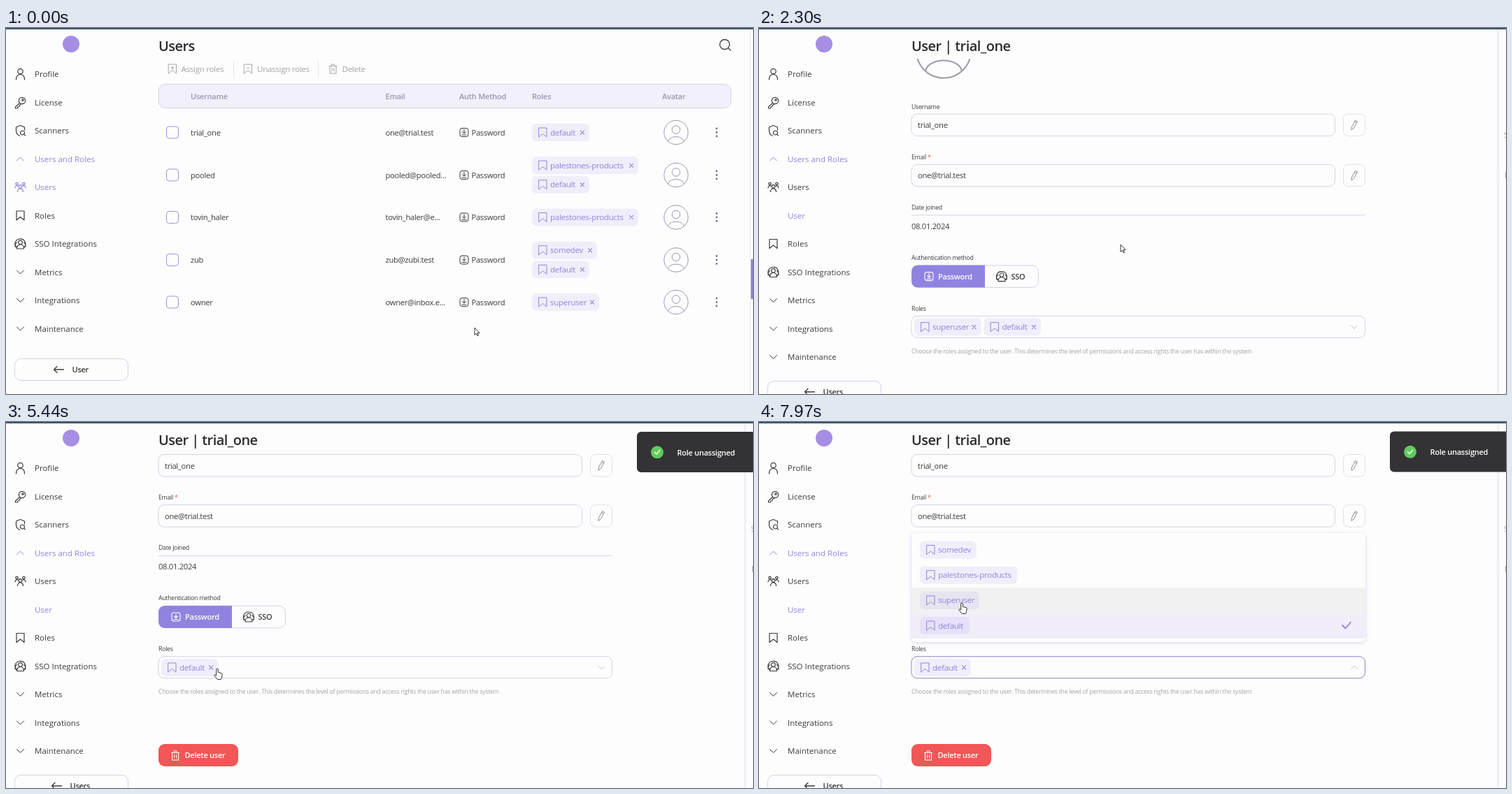
Write an HTML page that moves like this. It is 1068 px wide and 524 px high and loops after 8 s.

```html
<!DOCTYPE html>
<html lang="en">
<head>
<meta charset="utf-8">
<title>Users</title>
<style>
  html, body { margin: 0; width: 100%; height: 100%; overflow: hidden; background: #fdfdfd; }
  svg { display: block; width: 1068px; height: 524px; }
  text { font-family: "Open Sans", "Noto Sans", sans-serif; fill: #3b3b40; white-space: pre; }
  .title { font-size: 20px; font-weight: 600; letter-spacing: -.55px; fill: #2c2c31; }
  .nav { font-size: 11.5px; }
  .body { font-size: 11.2px; letter-spacing: -.3px; }
  .chip { font-size: 11.6px; letter-spacing: -.3px; }
  .bold { font-size: 11px; font-weight: 600; letter-spacing: -.25px; }
  .label { font-size: 8.7px; font-weight: 500; letter-spacing: -.24px; }
  .purple { fill: #9084e0; }
  .gray { fill: #a4a4a8; }
  .head { fill: #9b97b4; }
  .white { fill: #fff; }
  .icon { fill: none; stroke-linecap: round; stroke-linejoin: round; }
</style>
</head>
<body>
<svg id="stage" viewBox="0 0 1068 524" xmlns="http://www.w3.org/2000/svg"></svg>
<script>
const DARK = '#3b3b40', PURPLE = '#9084e0', GRAY = '#a4a4a8', EDGE = '#d6d1ea';
const LOOP = 8000;
const ACCOUNT = 'trial_one', EMAIL = 'one@trial.test', TEAM = 'palestones-products';

// Icons are drawn around their own centre.
const circle = (x, y, r) => `M${x - r} ${y}a${r} ${r} 0 1 0 ${2 * r} 0a${r} ${r} 0 1 0 ${-2 * r} 0`;
const MARK = 'M-5.5-6.5h11v13l-5.5-4.5-5.5 4.5z';
const ICONS = {
  user: circle(0, -4, 3.7) + 'M-6 8c0-5 2-7.5 6-7.5s6 2.500 6 7.500',
  key: circle(2.5, -2.5, 4.7) + circle(3.5, -3.5, 1.2) + 'M-1 1l-6 5.500v2h3l.5-2 2-.5.5-2 2-1.500',
  scan: 'M6-1v-4l-6-2.500-6 2.500v5c0 4 2 6 5 7.500' + circle(3, 3, 3) + 'M5.200 5.200l2 2',
  up: 'M-5 2.500l5-5 5 5',
  down: 'M-5-2.500l5 5 5-5',
  group: circle(0, -1, 2.3) + circle(-5, -5, 1.7) + circle(5, -5, 1.7) +
    'M-4 6.500c0-6 8-6 8 0M-7.500 1c0-3 2-3.500 4-3M7.500 1c0-3-2-3.500-4-3',
  mark: MARK,
  sso: 'M-6 5c-3-4-2-11 5-12 8-.5 10 7 7 12' + circle(0, -2, 2.8) +
    'M-5 7c0-4 2-6 5-6s5 2 5 6zM-5-2c-2 1-2.500 3-2.500 6h2M5-2c2 1 2.500 3 2.500 6h-2',
  login: 'M-3-6h6q3 0 3 3v6q0 3-3 3h-6q-3 0-3-3v-6q0-3 3-3M0-4v5M-2.500-1l2.500 2.500 2.500-2.500M-3 3.500h6',
  plus: MARK + 'M-2-1.500h4M0-3.500v4',
  minus: MARK + 'M-2-1.500h4',
  trash: 'M-5.500-4h11M-2-4v-2.500h4v2.500M-4.500-4v10.500h9v-10.500M-1.500-1v4.500M1.500-1v4.500',
  cross: 'M-2.600-2.600l5.200 5.200M2.600-2.600l-5.200 5.200',
  check: 'M-6 0l4.500 4.500 7.500-9',
  arrow: 'M7 0h-14M-2.500-4.500l-4.500 4.500 4.500 4.500',
  pencil: 'M-4 7l.5-4 5-9.500 3 1.600-5 9.400zM.5-4.500l3 1.600',
  search: circle(-.5, -.5, 7) + 'M5 5l3 3'
};

const icon = (name, x, y, color = DARK, width = 1.1) =>
  `<path class="icon" d="${ICONS[name]}" transform="translate(${x} ${y})" stroke="${color}" stroke-width="${width}"/>`;
const text = (x, y, str, cls) => `<text x="${x}" y="${y}" class="${cls}">${str}</text>`;
const rect = (x, y, w, h, r, fill = 'none', stroke = 'none') =>
  `<rect x="${x}" y="${y}" width="${w}" height="${h}" rx="${r}" fill="${fill}" stroke="${stroke}"/>`;
const line = (d, color, width = 1) => `<path d="${d}" fill="none" stroke="${color}" stroke-width="${width}"/>`;
const group = (id, content, extra = '') => `<g id="${id}" ${extra}>${content}</g>`;

function chip(x, y, name, w, closable = true) {
  return rect(x, y - 12.5, w, 25, 6, 'rgba(130,110,220,.1)') +
    icon('mark', x + 15.5, y, PURPLE, 1) + text(x + 26, y + 4, name, 'chip purple') +
    (closable ? icon('cross', x + w - 10, y, PURPLE) : '');
}

function avatar(x, y, r, width, color) {
  const k = r / 39;
  return `<g fill="none" stroke="${color}" stroke-width="${width}"><circle cx="${x}" cy="${y}" r="${r}"/>` +
    `<circle cx="${x}" cy="${y - 9 * k}" r="${13 * k}"/>` +
    `<path d="M${x - 26 * k} ${y + 29 * k}c${4 * k} ${-20 * k} ${48 * k} ${-20 * k} ${52 * k} 0"/></g>`;
}

function sidebar(items, active, backLabel, backY) {
  return items.map(([name, glyph], i) => {
    const y = 66 + i * 40.5;
    const on = active.includes(name);
    const color = on ? PURPLE : DARK;
    return (glyph ? icon(glyph, 20.5, y, color, glyph === 'up' || glyph === 'down' ? 1 : 1.2) : '') +
      text(41, y + 4, name, 'nav' + (on ? ' purple' : ''));
  }).join('') +
    rect(12.5, backY, 162, 31, 9, 'none', EDGE) +
    icon('arrow', backLabel === 'User' ? 75.5 : 72.5, backY + 15.5, DARK, 1.3) +
    text(backLabel === 'User' ? 94.5 : 91.5, backY + 19.5, backLabel, 'bold');
}

function navItems(withUser) {
  return [['Profile', 'user'], ['License', 'key'], ['Scanners', 'scan'], ['Users and Roles', 'up'],
    ['Users', 'group'], ...(withUser ? [['User', '']] : []), ['Roles', 'mark'],
    ['SSO Integrations', 'sso'], ['Metrics', 'down'], ['Integrations', 'down'], ['Maintenance', 'down']];
}

function tableRow([y, name, email, ...roles]) {
  const first = y - (roles.length - 1) * 13.8;
  return rect(229.5, y - 8.5, 17, 17, 4, 'none', '#9a90dc') +
    text(264, y + 4, name, 'body') + text(542.5, y + 4, email, 'body') +
    icon('login', 655, y, DARK, 1) + text(665.5, y + 4, 'Password', 'body') +
    roles.map(([role, w], i) => chip(752, first + i * 27.6, role, w)).join('') +
    avatar(958, y, 17.2, 1, '#9b98b4') +
    [-5.5, 0, 5.5].map(d => `<circle cx="1016" cy="${y + d}" r="1.4" fill="#77758c"/>`).join('');
}

function listPage() {
  const def = ['default', 82], team = [TEAM, 152];
  const rows = [
    [149.5, ACCOUNT, EMAIL, def],
    [210.5, 'pooled', 'pooled@pooled...', team, def],
    [271, 'tovin_haler', 'tovin_haler@e...', team],
    [332, 'zub', 'zub@zubi.test', ['somedev', 93], def],
    [392.5, 'owner', 'owner@inbox.e...', ['superuser', 96]]
  ];
  const heads = [[264, 'Username'], [542.5, 'Email'], [648, 'Auth Method'], [752, 'Roles'], [938, 'Avatar']];
  return sidebar(navItems(false), ['Users and Roles', 'Users'], 'User', 473.5) +
    text(218, 33, 'Users', 'title') + icon('search', 1028, 24, DARK, 1.3) +
    icon('plus', 238, 58.5, GRAY, 1) + text(250.5, 62.5, 'Assign roles', 'chip gray') +
    icon('minus', 346, 58.5, GRAY, 1) + text(359, 62.5, 'Unassign roles', 'chip gray') +
    icon('trash', 467.5, 58.5, GRAY, 1) + text(480.5, 62.5, 'Delete', 'chip gray') +
    line('M325.500 46v26M446.500 46v26', '#e4e3ea') +
    rect(218, 80.5, 818.5, 34, 10, '#f2f0fa', EDGE) +
    heads.map(([x, name]) => text(x, 101.5, name, 'bold head')).join('') +
    rows.map(tableRow).join('') +
    line('M1064 2v522', '#f3f1f8', 2) + rect(1065, 331, 3, 57, 0, '#8c80d6');
}

function field(y, label, value) {
  return text(218, y - 7.5, label, 'label') +
    rect(218, y, 605.5, 31.5, 8, 'none', EDGE) + text(227, y + 20, value, 'body') +
    rect(835.5, y, 31, 31.5, 7, 'none', '#e2dfee') + icon('pencil', 851, y + 15.5, '#8d8b97', 1);
}

function userPage() {
  const form =
    avatar(264, 100, 39, 2, '#9c9aa8') +
    field(190.5, 'Username', ACCOUNT) +
    field(262.7, 'Email <tspan fill="#ef5350">*</tspan>', EMAIL) +
    text(218, 327, 'Date joined', 'label') + line('M218 335.300h649', EDGE) +
    text(218, 355, '08.01.2024', 'body') +
    text(218, 399.3, 'Authentication method', 'label') +
    rect(218.5, 407.3, 181, 31.5, 9, 'none', EDGE) +
    '<path d="M323 407v32h-95q-10 0-10-10v-12q0-10 10-10z" fill="#9083e0"/>' +
    icon('login', 243, 423, '#fff') + text(256, 427, 'Password', 'bold white') +
    icon('sso', 347, 423) + text(360.5, 427, 'SSO', 'bold') +
    text(218, 472, 'Roles', 'label') +
    `<rect id="select" x="218" y="479.800" width="648.500" height="31" rx="8" fill="none"/>` +
    group('bothRoles', chip(222, 495.5, 'superuser', 95.5) + chip(321.5, 495.5, 'default', 81.5)) +
    group('oneRole', chip(222, 495.5, 'default', 81)) +
    `<g id="chevron">${icon('down', 0, 0, '#bbb8c8', 1)}</g>` +
    text(218, 533.3, 'Choose the roles assigned to the user. This determines the level of permissions ' +
      'and access rights the user has within the system', 'label gray') +
    rect(218, 605, 114, 32, 9, '#f25656') + icon('trash', 242, 621.5, '#fff') +
    text(255.5, 625.3, 'Delete user', 'bold white');
  return sidebar(navItems(true), ['Users and Roles', 'User'], 'Users', 505.5) +
    `<g clip-path="url(#below)">${group('form', form)}</g>` +
    text(218, 33, `User | ${ACCOUNT}`, 'title') +
    line('M1056.500 2v522', '#f1eff6', 3) +
    text(1065, 157, 'S', 'body gray') + line('M1067.500 206v9', GRAY);
}

function dropdown() {
  const options = [['somedev', 81], [TEAM, 139.5], ['superuser', 85], ['default', 71]];
  return '<rect x="218" y="159" width="649" height="156" rx="6" fill="#fdfdfd" filter="url(#shadow)"/>' +
    rect(218, 273.5, 649, 36.3, 0, '#f1eefa') +
    '<rect id="hover" x="218" width="649" height="36.300" fill="#f1f1f1"/>' +
    options.map(([name, w], i) => chip(230, 183 + i * 36.2, name, w, false)).join('') +
    icon('check', 840, 291, PURPLE, 1.8);
}

const toast = () => rect(902, 13.5, 180, 58, 6, '#333335') +
  '<circle cx="931" cy="42.800" r="9" fill="#61cc5c"/>' +
  `<g transform="translate(931 42.800) scale(.6)">${icon('check', 0, 0, '#fff', 2.4)}</g>` +
  text(959.5, 47, 'Role unassigned', 'bold white');

const stage = document.getElementById('stage');
stage.innerHTML =
  `<defs><clipPath id="below"><rect y="44" width="1068" height="480"/></clipPath>
   <filter id="shadow" x="-5%" y="-10%" width="110%" height="125%">
     <feDropShadow dx="0" dy="1" stdDeviation="2.5" flood-color="#8a80c0" flood-opacity=".35"/></filter></defs>` +
  rect(0, 0, 1068, 524, 0, '#fdfdfd') +
  group('list', listPage()) + group('detail', userPage()) +
  '<circle cx="93" cy="23" r="12" fill="#a58ee4"/>' +
  group('menu', dropdown()) +
  '<path id="caret" d="M315.500 344v15" stroke="#333" stroke-width="1"/>' +
  rect(0, 0, 1068, 2, 0, '#405465') +
  group('toast', toast()) +
  group('ripple', '<circle id="ring"/><circle r="2.700"/>', 'fill="none" stroke="#f0655f" stroke-width="1.300"') +
  group('cursor',
    '<path id="pointer" d="M0 0v10.500l2.400-2.200 1.700 3.600 1.500-.7-1.700-3.500h3.300z"/>' +
    '<path id="hand" d="M-1.300 1q1.300-2 2.600 0v4.500l4.700 1q1.500.5 1.200 2.500l-.9 4.500-1 2h-5l-4.200-5q-1-1.500.6-1.700l2 1.200z"/>',
    'fill="#fff" stroke="#333" stroke-width="1" stroke-linejoin="round"');

const el = id => document.getElementById(id);
const show = (id, on) => el(id).setAttribute('visibility', on ? 'inherit' : 'hidden');
const move = (id, x, y, more = '') => el(id).setAttribute('transform', `translate(${x} ${y})${more}`);
const smooth = p => p * p * (3 - 2 * p);
const progress = (t, start, length) => Math.min(1, Math.max(0, (t - start) / length));

const PATH = [[0, 670, 429], [150, 670, 429], [1000, 275, 146], [1150, 275, 146], [1400, 362, 181],
  [1850, 517, 310], [3000, 517, 310], [4300, 314, 352], [4600, 308, 352], [4850, 308, 352],
  [5440, 302, 353], [5850, 330, 352], [6100, 330, 352], [6750, 298, 218], [7000, 297, 232],
  [7140, 296, 241], [7450, 290, 259], [LOOP, 290, 259]];
const CLICKS = [[1100, 275, 146], [4700, 308, 352], [5950, 330, 352]];
const OPENED = 6050, LEFT_LIST = 1250, REMOVED = 5000;

function cursorAt(t) {
  const i = PATH.findIndex(([end], n) => n > 0 && t <= end);
  const [t0, x0, y0] = PATH[i - 1], [t1, x1, y1] = PATH[i];
  const p = smooth((t - t0) / (t1 - t0));
  return [x0 + (x1 - x0) * p, y0 + (y1 - y0) * p];
}

function render(t) {
  const open = t >= OPENED;
  show('list', t < LEFT_LIST);
  show('detail', t >= LEFT_LIST);

  const scroll = 67.4 * smooth(progress(t, 2000, 150)) + 76.6 * smooth(progress(t, 2500, 200));
  move('form', 0, -scroll);
  show('bothRoles', t >= LEFT_LIST && t < REMOVED);
  show('oneRole', t >= REMOVED);
  el('select').setAttribute('stroke', open ? '#8c81cc' : EDGE);
  move('chevron', 851, 495.5, open ? ' scale(.9 -.9)' : ' scale(.9)');

  show('menu', open);
  show('caret', open && (t - 6000) % 1060 < 530);
  const row = Math.floor((cursorAt(Math.max(0, t - 100))[1] - 164.8) / 36.25);
  el('hover').setAttribute('y', 164.8 + row * 36.25);
  show('hover', open && row >= 0 && row < 3);

  show('toast', t >= 5050);
  move('toast', 0, 0.5 - 80 * (1 - progress(t, 5050, 350)) ** 3 - 0.5 * progress(t, 5450, 100));

  const click = CLICKS.find(([start]) => t >= start && t < start + 450);
  show('ripple', click);
  if (click) {
    move('ripple', click[1], click[2]);
    el('ring').setAttribute('r', 4 + 9 * progress(t, click[0], 200));
  }

  const hand = t > 4150;
  move('cursor', ...cursorAt(t));
  show('pointer', !hand);
  show('hand', hand);
}

const begin = performance.now();
function tick() {
  render((performance.now() - begin) % LOOP);
  requestAnimationFrame(tick);
}
tick();
</script>
</body>
</html>
```
